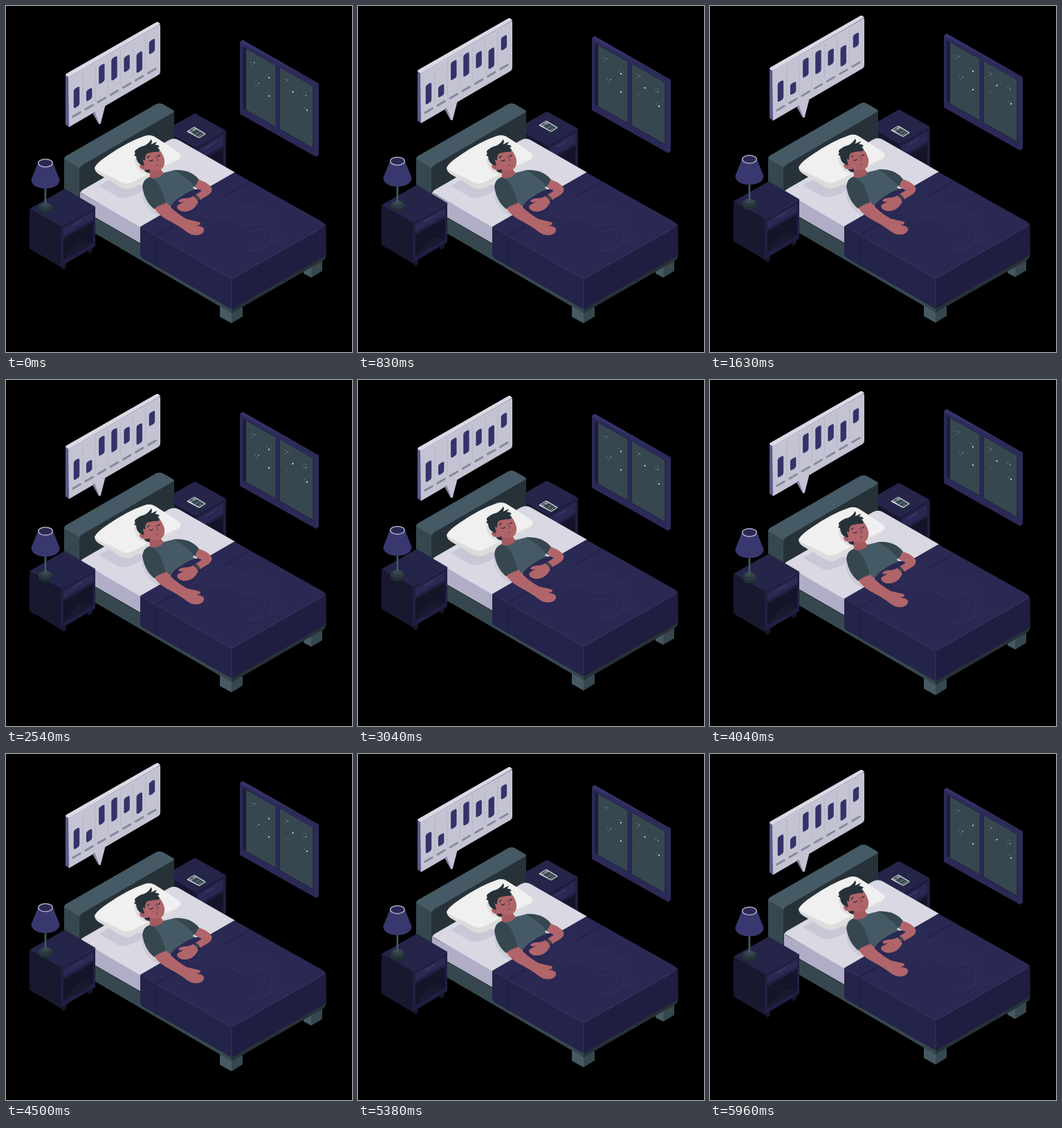
Write an HTML page that moves like this. It is 500 by 500 pixels and loops after 6000 ms.

```html
<!DOCTYPE html>
<html lang="en">
<head>
<meta charset="utf-8">
<title>Sleep tracking</title>
<style>
html, body { margin: 0; height: 100%; background: #000; overflow: hidden; }
svg { display: block; width: 100vw; height: 100vh; }
.line { fill: none; stroke-linecap: round; stroke-linejoin: round; }
</style>
</head>
<body>
<svg viewBox="0 0 500 500">
  <!-- data-float: rise in px, period in ms, delay in ms -->
  <g id="chart" data-float="10 3000 0">
    <path fill="#5b598a" d="M86 100L91 103V175L86 171Z"/>
    <path fill="#dad9e5" d="M86 100Q86 98.500 88 97.300L217 23.500Q219 22.500 220.500 23.500L223 26L90.500 103Z"/>
    <path fill="#c4c3d3" d="M90 103L221 27.300Q223 26.500 223 28.500V94Q223 98 220 99.700L91 175Z"/>
    <path fill="#8685a8" d="M125 154.500L129 152L137 170L134.500 170.500Q133.500 170 133 169Z"/>
    <path fill="#c4c3d3" d="M128 152L143.500 144L137 169Q136.500 171 135 170.500Z"/>
  </g>

  <g data-float="10 3000 0">
    <path fill="#35346b" d="M338 52L342 49L452 112L448 115.500L338 53Z"/>
    <path fill="#2b2a56" d="M338 52L452 112V215L448 218L338 156Z"/>
    <path fill="#1d1c3c" d="M342.500 59L390 86V175L342.500 148ZM394.500 88.500L444.500 117V206.500L394.500 178Z"/>
    <path fill="#37474f" d="M347 62L389.500 86V174L347 150ZM395.500 89L443.500 116.500V205L395.500 177.500Z"/>
    <path class="line" stroke="#35346b" stroke-width=".7" d="M339 53L448 115.500V217"/>
    <g id="stars" fill="#dfe5e8"></g>
  </g>

  <g data-float="10 6000 0">
    <path fill="#252449" d="M273 155L318 180L274 205.500L229 180Z"/>
    <path fill="#161631" d="M229 180L274 205.500V262L229 236Z"/>
    <path fill="#1f1e40" d="M274 205.500L318 180V236L274 261Z"/>
    <path fill="#292852" d="M278 207L314 186V201L278 222Z"/>
    <path fill="#141329" d="M278 226L314 205V235L278 255Z"/>
    <path class="line" stroke="#3b3a66" stroke-width="1.800" d="M287 206L300 198.500"/>
  </g>

  <g data-float="10 1500 0">
    <path fill="#263238" d="M261.500 181V182.500L279 192L288.500 186V184.500L279 189Z"/>
    <path fill="#cfd5dc" d="M261.500 181L271 175Q272 174.500 273 175L288 184Q289 185 288 185.500L280 190.500Q279 191 278 190.500L262 182Z"/>
    <path fill="#37474f" d="M263.700 180.700L271.600 175.700L287 185L279 189.700Z"/>
    <text transform="matrix(.82 -.48 .82 .48 267.500 183)" font-family="Lato, sans-serif" font-size="5" font-weight="700" fill="#fff">1:30</text>
    <path class="line" stroke="#9aa6b5" stroke-width=".7" d="M274 185.500L279 182.400M278 188L283 185"/>
  </g>

  <g data-float="10 3000 1500">
    <!-- bed frame -->
    <path fill="#455a64" d="M309 430L326 440V458.500L309 449ZM430 368L441 368V392.500L430 386.500Z"/>
    <path fill="#37474f" d="M326 440L342 431V448.500L326 458.500ZM441 370L457 360V383L441 392.500Z"/>
    <path fill="#37474f" d="M84 222Q84 217 88 217L107 231V316L84 302Z"/>
    <path fill="#263238" d="M106 232L243 152V230L106 309Z"/>
    <path fill="#455a64" d="M84.500 221.500Q84 218.500 88 216L217 141.800Q222 139.500 227 142L241 150Q244 152 242 153.500L111 229.500Q107 232 106.500 234.500Z"/>
    <path fill="#37474f" d="M84 280L326 420V444L84 302.500Z"/>
    <path fill="#263238" d="M326 420L462.500 345V361Q462 365.500 458 368L326 444Z"/>
    <!-- mattress -->
    <path fill="#b0aec7" d="M107 270L195 318V343.500L110 294.500Q107 293 107 290Z"/>
    <path fill="#d9d8e3" d="M107 272Q107 268 112 265L236 193.500Q243 190 250 194L331 240.500L194 319.500L110 271Q107 269.500 107 272Z"/>
    <path fill="#c9c8d6" d="M134 260L150 251L206 261L196 268Q172 281 162 276Z"/>
    <path fill="#cccbd8" d="M197 266Q194 284 212 299Q226 308 240 299L215 262Z"/>
    <!-- pillow -->
    <path fill="#dcdcdd" d="M128 233Q128 239 134 243L166 262Q176 267 185 262L246 226Q253 222 253 216L210 201Z"/>
    <path fill="#f0f0f0" d="M129 232Q132 226 147 216Q176 196 200 188Q208 185 215 189Q233 200 250 212Q256 217 248 222Q213 238 184 254Q175 259 166 254L133 238Q127 235 129 232Z"/>
    <path fill="#dedee0" d="M187 208Q183 222 189 233Q196 243 211 245L222 232Z"/>
    <!-- blanket -->
    <path fill="#242349" d="M194 319L326 394V438.500L198 365Q194 362.500 194 359Z"/>
    <path fill="#1f1e40" d="M326 394L459 315Q462.500 314 462.500 319V355Q462 360 458 363L326 438.500Z"/>
    <path fill="#2a2953" d="M194 319L330 240.500L458 312.500Q464 316 458 320L330 393Q326 395.500 322 393Z"/>
    <path fill="#2c2b56" d="M250 300L300 270Q325 272 340 286Q360 283 378 299Q392 300 397 309L392 331Q414 340 409 344Q390 343 374 357Q353 366 338 351Q363 352 373 340Q378 328 370 321Q347 335 321 311Z"/>
    <path class="line" stroke="#27264f" stroke-width="2.500" d="M321 310Q342 327 358 321Q373 313 379 324Q380 336 373 345M338 351Q352 361 369 357Q382 349 388 347"/>
    <path class="line" stroke="#212044" stroke-width="1.800" d="M217 376V332L243 317M314 276L353 253.500"/>
    <path class="line" stroke="#44436d" stroke-width=".6" d="M195 319.500L322 392.500Q326 395 330 392.500L458 319.500M326 395V437"/>
    <!-- sleeper -->
    <path fill="#455a64" d="M207 247Q220 249 228 241L244 237L262 239Q274 244 278 250L270 263L277 267L242 291L226 285Z"/>
    <path fill="#37474f" d="M243 237Q263 236 274 246L279 251L273 262Q263 249 243 237Z"/>
    <path fill="#2a2953" d="M235 295Q240 283 252 276Q268 265 279 264L291 272L270 300L246 306Z"/>
    <path fill="#b0656a" d="M214 292L231 283Q242 297 261 308L274 311Q282 312 281 315Q279 317 274 317.500Q285 318 286 322Q287 327 281 330Q271 333.500 262 327Q252 319 237 311Q222 304 214 292Z"/>
    <path fill="#37474f" d="M208 247Q199 249 197 261Q200 282 214 293.500Q220 288 231 284.500Q226 268 222 260Q216 250 208 247Z"/>
    <path fill="#b0656a" d="M279 251Q294 256 297.500 264Q298 270 291 274L279 281Q274 293 265 296Q255 299 249 294Q246 291 248 288L257 283Q250 285 249 282Q250 279 257 278Q266 278 272 274L283 267L273 262Z"/>
    <path class="line" stroke="#262550" stroke-width="4" d="M273.500 275Q278 277 278.500 281"/>
    <path fill="#37474f" d="M272 275L276 273.500L280 279L277 281Z"/>
    <path fill="#a45a60" d="M207 234L223 232Q224 239 228 241Q224 249 211 249Q207 248 208 246Z"/>
    <path fill="#263238" d="M200 238Q205 242 208 241V236L200 230Z"/>
    <path fill="#b0656a" d="M197 212L219 205Q226 211 229 222Q230 233 224 236Q215 240 206 236Q201 238 196 236Q191 232 194 229L199 230Z"/>
    <path fill="#263238" d="M196 230Q188 226 188 217L185 216L187 213Q184 210 189 207Q191 205 196 203Q204 202 210 192.500Q212 196 209.500 200L218 196Q217 199 215 200.500Q220 200 222 203L219 205Q223 207 221 210Q212 211 204 213Q201 215 201 223L198 222L200 231Z"/>
    <path class="line" stroke="#263238" stroke-width="1.300" d="M204.500 219.500Q205 217.500 207 217M217 210.500Q219 209 220.500 210M207.500 223.500Q210 225 212 222.500M218.500 217Q221 217.500 222.500 215.500"/>
    <path class="line" stroke="#7c3d47" d="M215 218L220 222Q219 224 217 224M217 230.500L220 229.500M196 231.500Q198 232 199 234"/>
  </g>

  <g data-float="20 6000 0">
    <path fill="#15152c" d="M37 350L42 353V356L37 353ZM118 352L125 348V354.500L120 357.500L118 356ZM80 374L87 371V378.500L83.500 381L80 379Z"/>
    <path fill="#18182f" d="M34 293L80 319V378L34 350.500Z"/>
    <path fill="#201f42" d="M80 319L129 290V347L80 376Z"/>
    <path fill="#252449" d="M85 264L129 290L80 319L34 293Z"/>
    <path fill="#2a2953" d="M83 321.500L126 296.500V307.500L83 332.500Z"/>
    <path fill="#151529" d="M83 336.500L126 311.500V342L83 367Z"/>
    <path fill="#19192f" d="M83 367L104 340L126 342Z"/>
    <path class="line" stroke="#3b3a66" stroke-width="1.800" d="M97 316.500L110 309"/>
    <path class="line" stroke="#2b2a52" stroke-width=".6" d="M80 376V319L129 290"/>
  </g>

  <g data-float="10 6000 0">
    <path fill="#222e35" d="M47 290V294Q48 300 57 300Q66 300 67 294V290Z"/>
    <ellipse cx="57" cy="290" rx="10" ry="6" fill="#2b3940"/>
    <ellipse cx="57" cy="287.500" rx="6.500" ry="3.700" fill="#37474f"/>
    <path stroke="#455a64" stroke-width="2.600" d="M57 260V287"/>
    <path fill="#39386e" d="M46 227L36.500 251C36 268 78 268 77.500 251L68 227Z"/>
    <ellipse cx="57" cy="227" rx="10.300" ry="5.700" fill="#2a2955" stroke="#aaa9c1" stroke-width="1.500"/>
  </g>
</svg>
<script>
const make = (parent, name, attrs) => {
  const el = document.createElementNS('http://www.w3.org/2000/svg', name);
  for (const key in attrs) el.setAttribute(key, attrs[key]);
  parent.append(el);
};

// Daily bars: top and bottom at the bar's middle
const bars = [[118, 146], [120, 136], [85, 111], [74, 106], [72, 94], [67, 95], [49, 68]];
const chart = document.getElementById('chart');
bars.forEach(([top, bottom], i) => {
  const x = 102 + 18.15 * i, y = 156.8 - 10.5 * i;
  make(chart, 'rect', { x: -4.2, y: top, width: 8.4, height: bottom - top, rx: 2.6,
    fill: '#343369', transform: `translate(${x} 0) skewY(-30)` });
  make(chart, 'path', { class: 'line', d: `M${x - 5.3} ${y + 3.1}l10.600 -6.200`,
    stroke: '#878b99', 'stroke-width': 3 });
  if (i < 6) make(chart, 'path', { class: 'line', d: `M${x + 9} ${y - 60}v50`,
    stroke: '#a09eb1', 'stroke-width': .6, 'stroke-dasharray': '2 2.500' });
});

const stars = document.getElementById('stars');
[[354, 80.5], [359, 82, .9], [356, 85], [377, 99.5], [380, 103.5, 1.1], [360, 111], [365, 112, .9],
  [362, 115], [380, 130, 1.1], [403, 105], [407, 107, .9], [404, 109.5], [414.5, 124, 1.1],
  [405, 133], [430, 127], [433, 125], [433.5, 129.5, .9], [431.5, 147], [435, 150.5, 1.1]]
  .forEach(([cx, cy, r = .6]) => make(stars, 'circle', { cx, cy, r, opacity: r > 1 ? 1 : .6 }));

const floats = [...document.querySelectorAll('[data-float]')]
  .map(el => [el, ...el.dataset.float.split(' ').map(Number)]);

function draw() {
  const time = performance.now() % 6000;
  for (const [el, rise, period, delay] of floats) {
    const phase = Math.max(0, time - delay) / period % 1;
    el.setAttribute('transform', `translate(0 ${-rise * (1 - Math.abs(1 - 2 * phase))})`);
  }
  requestAnimationFrame(draw);
}
draw();
</script>
</body>
</html>
```
